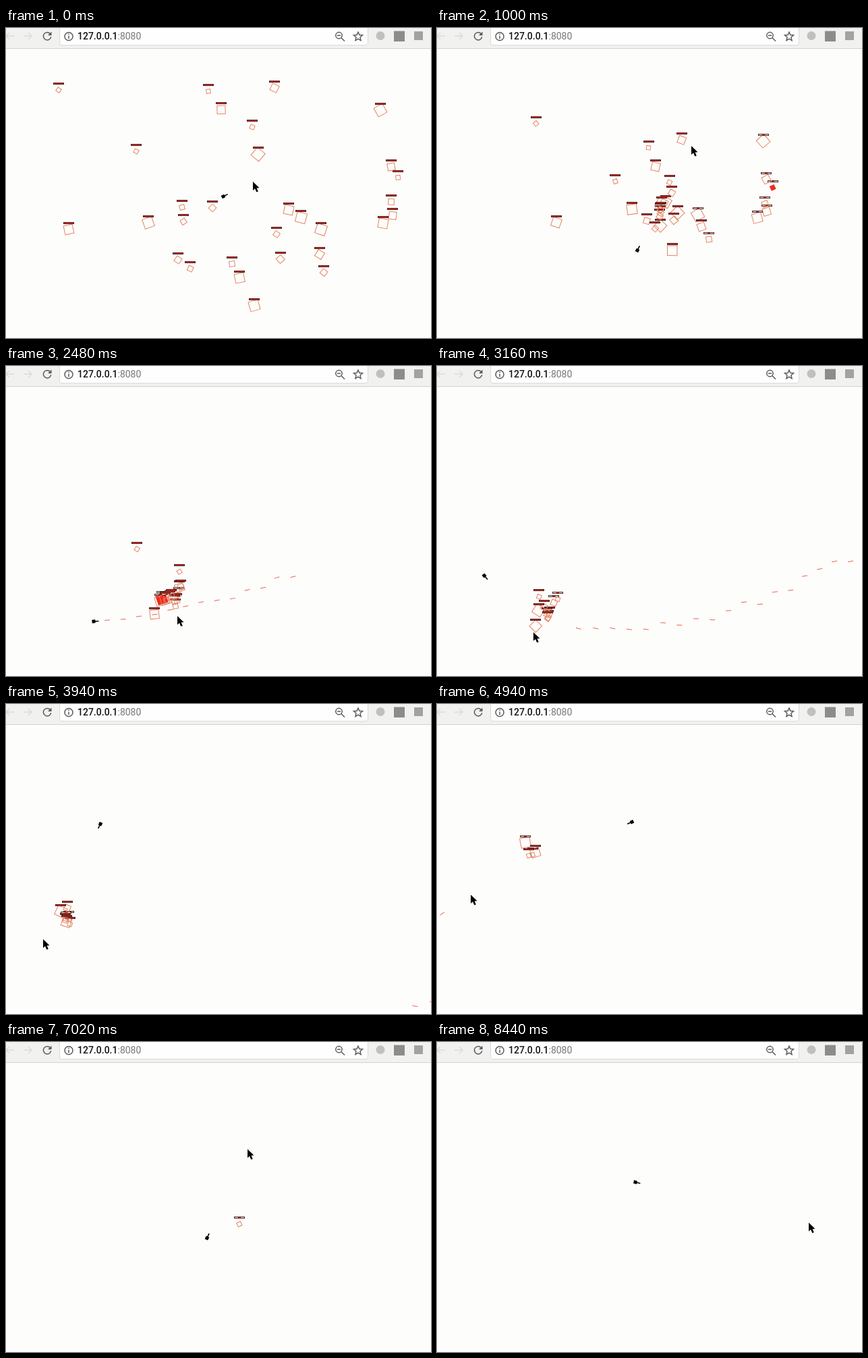
Recreate the animation shown at these times as an HTML page with a canvas. Size 630 px wide and 460 px high, loop 8.46 s.

```html
<!DOCTYPE html>
<html lang="en">
<head>
<meta charset="utf-8">
<title>Square shooter</title>
<style>
html, body { margin: 0; width: 630px; height: 460px; overflow: hidden; background: #fdfdfc; }
svg, canvas { position: absolute; left: 0; top: 0; }
text { font: 14px Roboto, Arial, sans-serif; }
.host { font-weight: 500; fill: #111; }
</style>
</head>
<body>
<svg width="630" height="460" fill="none" stroke="#5a5a5a" stroke-width="1.5">
  <path d="M0 0H630V30H0Z" fill="#f1f1f0" stroke="none"/>
  <path d="M0 30.5H630" stroke="#d2d2d0" stroke-width="1"/>
  <path d="M79.5 -1V22Q79.5 25.5 83 25.5H533Q536.5 25.5 536.5 22V-1" fill="#fefefe" stroke="#dadad8" stroke-width="1"/>
  <path d="M12 12H0M5 7L0 12L5 17M26 12H38M33 7L38 12L33 17" stroke="#dcdcda"/>
  <path d="M65.5 8.5A5.7 5.7 0 1 0 66.7 13"/>
  <path d="M67.5 5.5V11H62Z" fill="#5a5a5a" stroke="none"/>
  <circle cx="93" cy="12.5" r="6"/>
  <path d="M93 11.5V16M93 8.5V10"/>
  <text x="106" y="17" fill="#777" stroke="none"><tspan class="host">127.0.0.1</tspan>:8080</text>
  <circle cx="493.5" cy="11" r="4.7"/>
  <path d="M497 14.5L502 19.5M491 11H496"/>
  <path d="M522 6L523.9 10.3L528.5 10.7L525 13.8L526 18.4L522 16L518 18.4L519 13.8L515.5 10.7L520.1 10.3Z"/>
  <g stroke="none">
    <circle cx="555" cy="11.5" r="6.5" fill="#c0c0c0"/>
    <path d="M575 4.5H591V20H575Z" fill="#8c8c8c"/>
    <path d="M605 5H618V18H605Z" fill="#a2a2a2"/>
  </g>
</svg>
<canvas width="630" height="460"></canvas>
<script>
const LOOP = 8460, STEP = 20, COUNT = 30;
const SHOT_SPEED = .45, SHOT_GAP = 42, TURN_TIME = 480;
const c = document.querySelector('canvas').getContext('2d');

// Key points: [time, x, y]
const playerPath = [[0, 322, 250], [400, 345, 257], [1000, 297, 330], [1780, 208, 372],
  [2480, 130, 379], [2950, 70, 350], [3300, 70, 285], [3940, 140, 178], [4940, 289, 175],
  [6000, 362, 225], [7020, 298, 291], [8440, 294, 208]];
const cursorPath = [[0, 366, 228], [1000, 377, 175], [1500, 290, 430], [1850, 300, 340],
  [2480, 254, 371], [3300, 120, 400], [3940, 55, 349], [4250, 50, 285], [4940, 50, 283],
  [6300, 230, 130], [7020, 358, 159], [7700, 592, 250], [8440, 551, 268]];
const bursts = [[1450, 1600], [1940, 2900], [4150, 4440], [7060, 7250]];

// Squares start at these spots; a second round lands just below the first ones
const spots = [[300, 94], [365, 147], [571, 206], [571, 258], [261, 266], [419, 270], [335, 350],
  [465, 336], [255, 344], [401, 306], [78, 92], [398, 89], [555, 122], [193, 183], [211, 289],
  [93, 299], [467, 299], [306, 267], [368, 412], [559, 290]];

let seed = 11;
const rand = () => (seed = seed * 16807 % 2147483647) / 2147483647;
const ease = k => (k = Math.min(1, Math.max(0, k))) * k * (3 - 2 * k);
const angle = (a, b) => Math.atan2(b[1] - a[1], b[0] - a[0]);

function at(path, t) {
  const i = path.findIndex(p => p[0] > t);
  if (i < 0) return path.at(-1).slice(1);
  const [t0, x0, y0] = path[i - 1], [t1, x1, y1] = path[i], k = (t - t0) / (t1 - t0);
  return [x0 + (x1 - x0) * k, y0 + (y1 - y0) * k];
}

const aim = t => angle(at(playerPath, t), at(cursorPath, t));

// Steers towards a point near the player with some inertia; one position per step
function pursue(x, y) {
  const dx = rand() * 24 - 12, dy = rand() * 24 - 12, track = [];
  let vx, vy;
  for (let t = 0; t < LOOP; t += STEP) {
    track.push([x, y]);
    const [px, py] = at(playerPath, t);
    const a = angle([x, y], [px + dx, py + dy]);
    const speed = .085 + .06 * ease((t - 1000) / 1500);
    const k = t ? STEP / TURN_TIME : 1;
    vx = (vx || 0) * (1 - k) + Math.cos(a) * speed * k;
    vy = (vy || 0) * (1 - k) + Math.sin(a) * speed * k;
    x += vx * STEP;
    y += vy * STEP;
  }
  return track;
}

const enemies = Array.from({ length: COUNT }, (_, i) => {
  let [x, y] = spots[i % spots.length];
  if (i >= spots.length) {
    x += rand() * 20;
    y += 8 + rand() * 35;
  }
  return { size: 6 + rand() * 9, track: pursue(x, y) };
});

// The swarm halves at a steady rate, rightmost squares first
enemies.sort((a, b) => b.track[0][0] - a.track[0][0]).forEach((e, i) => {
  e.death = Math.min(7300, 1040 + 1450 * Math.log2(COUNT / (COUNT - i)));
  e.hurt = e.death - 600;
});

const shots = bursts.flatMap(([from, to]) => {
  const list = [];
  for (let t = from; t < to; t += SHOT_GAP)
    list.push({ t, pos: at(playerPath, t), a: aim(t) + rand() * .06 - .03 });
  return list;
});

function place([x, y], a, draw) {
  c.save();
  c.translate(x, y);
  c.rotate(a);
  draw();
  c.restore();
}

function drawEnemy(e, t, player) {
  if (t >= e.death) return;
  const pos = e.track[t / STEP], s = e.size, hit = t > e.death - 70;
  place(pos, angle(pos, player), () => {
    c.strokeStyle = hit ? '#ee2a1c' : '#e58463';
    c.strokeRect(-s / 2, -s / 2, s, s);
    c.fillStyle = '#ee2a1c';
    if (hit) c.fillRect(-s / 2, -s / 2, s, s);
  });
  const x = Math.round(pos[0]) - 8, y = Math.round(pos[1]) - 11;
  const w = t >= e.hurt ? 4 : 14;
  c.fillStyle = '#4a2420';
  c.fillRect(x, y, 16, 3);
  c.fillStyle = '#fafafa';
  c.fillRect(x + 1, y + 1, 14, 1);
  c.fillStyle = '#e8241c';
  c.fillRect(x + 8 - w / 2, y + 1, w, 1);
}

function drawShot(s, t) {
  const d = (t - s.t) * SHOT_SPEED;
  const x = s.pos[0] + Math.cos(s.a) * d, y = s.pos[1] + Math.sin(s.a) * d;
  if (d < 8 || y < 34) return;
  place([x, y], s.a, () => {
    c.fillStyle = '#f0634a';
    c.fillRect(-4, -.5, 8, 1);
  });
}

function drawCursor(pos) {
  place(pos, 0, () => {
    const shape = new Path2D('M0 0V13L3 10.3L5.3 15.5L7.8 14.4L5.6 9.5L9.5 9.2Z');
    c.strokeStyle = '#fff';
    c.lineWidth = 2;
    c.stroke(shape);
    c.fillStyle = '#000';
    c.fill(shape);
  });
}

function frame(now) {
  const t = Math.floor(now % LOOP / STEP) * STEP, player = at(playerPath, t);
  c.clearRect(0, 0, 630, 460);
  shots.forEach(s => drawShot(s, t));
  enemies.forEach(e => drawEnemy(e, t, player));
  place(player, aim(t), () => {
    c.fillStyle = '#000';
    c.fillRect(-2.5, -2.5, 5, 5);
    c.fillRect(0, -.8, 7.5, 1.6);
  });
  drawCursor(at(cursorPath, t));
  requestAnimationFrame(frame);
}
requestAnimationFrame(frame);
</script>
</body>
</html>
```
